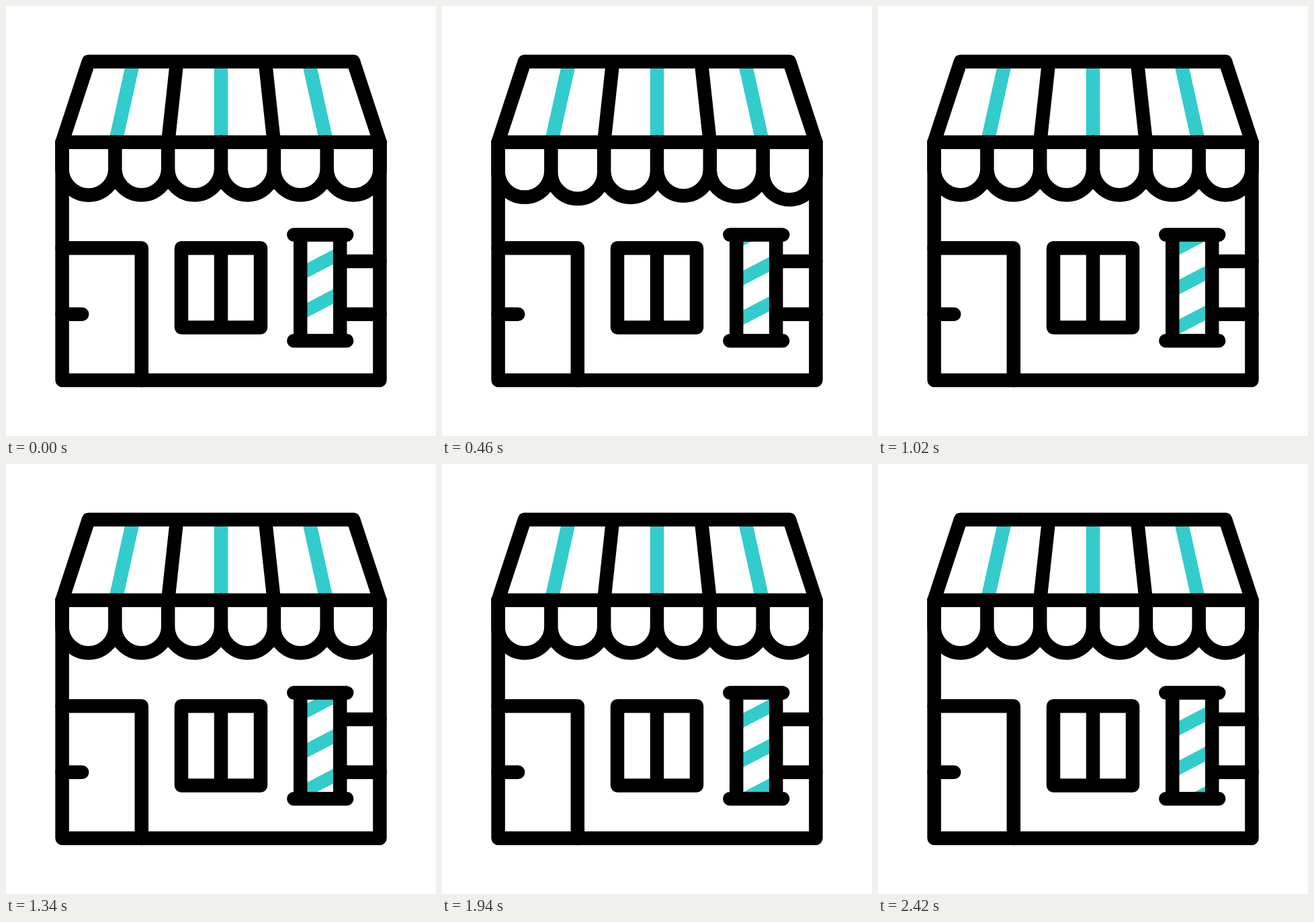
An HTML page that plays this animation: 640 px wide and 640 px high, repeating every 2440 ms.

```html
<!DOCTYPE html>
<html lang="en">
<head>
<meta charset="utf-8">
<title>Barber shop</title>
<style>
  html, body { margin: 0; height: 100%; overflow: hidden; background: #fff; }
  svg { display: block; width: 100%; height: 100%; }
  .teal { fill: none; stroke: #33cccc; stroke-width: 20.5; }
  .ink { fill: none; stroke: #000; stroke-width: 20.5; stroke-linecap: round; stroke-linejoin: round; }
</style>
</head>
<body>
<svg viewBox="0 0 640 640">
  <clipPath id="glass"><rect x="440" y="345" width="56" height="150"/></clipPath>
  <path class="teal" d="M189.4 83L162.8 203M320 83V203M450.6 83L477.2 203"/>
  <g clip-path="url(#glass)">
    <path id="stripes" fill="#33cccc"/>
  </g>
  <g class="ink">
    <path d="M122.9 82.8H517.1L556.5 202.8H83.5ZM254.2 82.8L241.2 202.8M385.8 82.8L398.8 202.8"/>
    <path d="M83.6 202.8V557H556.4V202.8"/>
    <path d="M83.5 360.3H201.8V557M83.5 458.7H113.2"/>
    <path d="M261 360.3H379V478.5H261ZM320 360.3V478.5"/>
    <path d="M428.3 340.6H507.2M428.3 498.2H507.2M438.2 340.6V498.2M497.2 340.6V498.2"/>
    <path d="M497.2 379.9H556.5M497.2 458.7H556.5"/>
    <path id="scallops"/>
  </g>
</svg>
<script>
  const LOOP = 2440, GAP = 58.9, STAGGER = 40;
  const scallops = document.getElementById('scallops');
  const stripes = document.getElementById('stripes');

  const triangle = (t, mid, half, peak) => peak * Math.max(0, 1 - Math.abs(t - mid) / half);

  // A large drop followed by a smaller one
  const drop = t => triangle(t, 160, 160, 18.8) + triangle(t, 420, 100, 5.6);

  function scallop(i, t) {
    const x = 83.5 + i * 473 / 6;
    const y = 242.1 + drop(t - i * STAGGER);
    return `M${x} 202.8V${y}a39.417 39.417 0 0 0 78.833 0V202.8`;
  }

  function stripe(i, t) {
    const y = 329.1 + GAP * (i + t / LOOP);
    return `M438 ${y}l60 -31.2v21.8l-60 31.2z`;
  }

  function draw(now) {
    const t = now % LOOP;
    scallops.setAttribute('d', [0, 1, 2, 3, 4, 5].map(i => scallop(i, t)).join(''));
    stripes.setAttribute('d', [0, 1, 2].map(i => stripe(i, t)).join(''));
  }

  const start = performance.now();
  function tick() {
    draw(performance.now() - start);
    requestAnimationFrame(tick);
  }
  tick();
</script>
</body>
</html>
```
